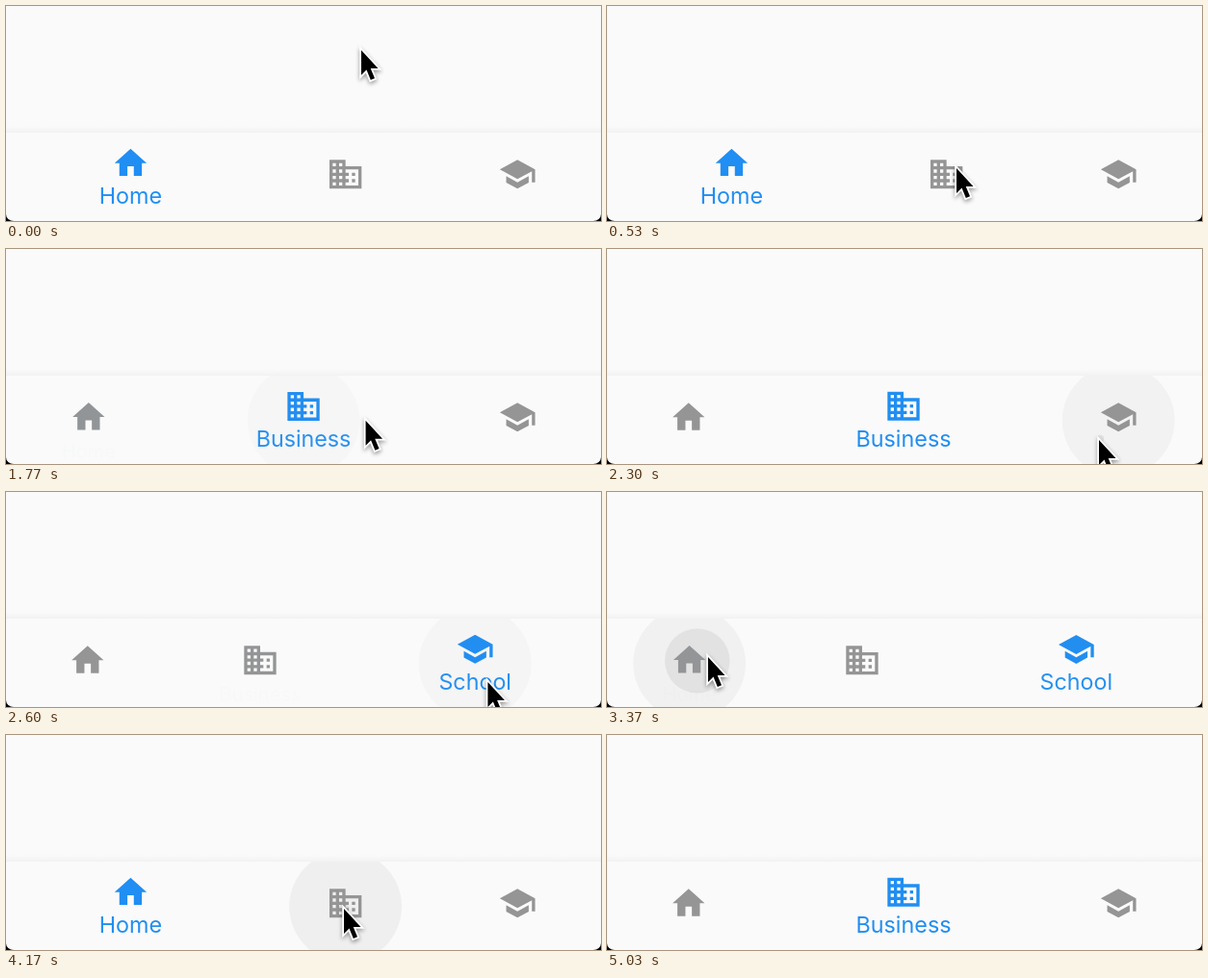
An HTML page with a canvas for the animation above (5.71 s loop, 618 by 224 pixels).

```html
<!DOCTYPE html>
<html lang="en">
<head>
<meta charset="utf-8">
<title>Bottom navigation</title>
<style>
  html, body { margin: 0; width: 100%; height: 100%; overflow: hidden; background: #000; }
  canvas { display: block; border-radius: 0 0 8px 8px / 0 0 7px 7px; }
</style>
</head>
<body>
<canvas width="618" height="224"></canvas>
<script>
const ctx = document.querySelector('canvas').getContext('2d');
const LOOP = 5710, WIDTH = 618, HEIGHT = 224;
const DP = 5 / 3;                       // pixels per layout unit
const BAR = { left: -3.5 - 0, top: 132, width: 375 * DP };
BAR.left = (WIDTH - 2 - BAR.width) / 2;
const INK_RADIUS = 35 * DP, INK_Y = BAR.top + 28 * DP;
const GREY = [149, 149, 149], BLUE = [32, 142, 242];

const items = [
  { label: 'Home', icon: new Path2D('M10 20v-6h4v6h5v-8h3L12 3 2 12h3v8z') },
  { label: 'Business', icon: new Path2D('M12 7V3H2v18h20V7H12zM6 19H4v-2h2v2zm0-4H4v-2h2v2zm0-4H4V9h2v2zm0-4H4V5h2v2zm4 12H8v-2h2v2zm0-4H8v-2h2v2zm0-4H8V9h2v2zm0-4H8V5h2v2zm10 12h-8v-2h2v-2h-2v-2h2v-2h-2V9h8v10zm-2-8h-2v2h2v-2zm0 4h-2v2h2v-2z') },
  { label: 'School', icon: new Path2D('M5 13.18v4L12 21l7-3.82v-4L12 17l-7-3.82zM12 3L1 9l11 6 9-4.91V17h2V9L12 3z') },
];

const taps = [
  { item: 1, down: 1470, up: 1610 },
  { item: 2, down: 2235, up: 2432 },
  { item: 0, down: 3262, up: 3354 },
  { item: 1, down: 4078, up: 4280 },
];

// Pointer path: time, x, y
const pointerPath = [
  [0, 369, 46], [30, 368, 48], [130, 356, 66], [230, 338, 97], [310, 333, 121],
  [400, 342, 147], [470, 355, 163], [530, 363, 169], [740, 363, 169], [770, 367, 169.5],
  [1080, 367, 169.5], [1150, 370, 170], [1240, 363, 173], [1330, 357, 174],
  [1700, 357, 174], [1790, 378, 180], [1900, 440, 192], [2000, 490, 199],
  [2070, 505, 201], [2100, 511, 199], [2500, 511, 199], [2600, 501, 198],
  [2680, 455, 192], [2870, 240, 176], [3000, 135, 172], [3110, 105, 172],
  [3500, 105, 172], [3600, 135, 171], [3760, 245, 172], [3900, 328, 178],
  [4000, 351, 181], [LOOP, 351, 181],
];
const POINTER_HIDDEN = 5000;
const arrow = new Path2D('M0 0V26L5.5 20.5 9.8 31 14 29.3 9.7 19H17.5Z');

const clamp = v => Math.min(1, Math.max(0, v));
const mix = (a, b, k) => a + (b - a) * k;

// cubic-bezier(.4, 0, .2, 1)
function ease(p) {
  p = clamp(p);
  let lo = 0, hi = 1;
  for (let i = 0; i < 24; i++) {
    const s = (lo + hi) / 2, r = 1 - s;
    if (1.2 * r * r * s + 0.6 * r * s * s + s ** 3 < p) lo = s; else hi = s;
  }
  return 3 * (1 - lo) * lo * lo + lo ** 3;
}

function pointerAt(t) {
  const i = Math.max(1, pointerPath.findIndex(k => k[0] > t));
  const [t0, x0, y0] = pointerPath[i - 1], [t1, x1, y1] = pointerPath[i];
  const k = (t - t0) / (t1 - t0);
  return [mix(x0, x1, k), mix(y0, y1, k)];
}

// How far each item is selected; the values always sum to 1
function selectionAt(t) {
  return taps.reduce((sel, tap) => {
    const k = ease((t - tap.up) / 200);
    return sel.map((v, i) => mix(v, i === tap.item ? 1 : 0, k));
  }, [1, 0, 0]);
}

function centersOf(sel) {
  let x = BAR.left;
  return sel.map(v => {
    const w = BAR.width * (1 + v / 2) / 3.5;
    x += w;
    return x - w / 2;
  });
}

function disc(x, y, r, color) {
  ctx.fillStyle = color;
  ctx.beginPath();
  ctx.arc(x, y, r, 0, 2 * Math.PI);
  ctx.fill();
}

function drawInk(t, centers) {
  ctx.save();
  ctx.beginPath();
  ctx.rect(0, BAR.top, WIDTH, HEIGHT);
  ctx.clip();
  for (const { item, down, up } of taps) {
    if (t < down || t > up + 200) continue;
    const cx = centers[item];
    const fade = clamp((t - up) / 200);
    const highlight = clamp((Math.min(t, up) - down) / 200) - fade;
    if (highlight > 0) disc(cx, INK_Y, INK_RADIUS, `rgba(188,188,188,${0.4 * highlight})`);
    const grow = clamp((Math.min(t, up) - down) / 1000 + Math.max(0, t - up) / 35);
    const [px, py] = pointerAt(down);
    disc(mix(px, cx, grow), mix(py, INK_Y, grow), INK_RADIUS * grow,
      `rgba(200,200,200,${0.4 * (1 - fade)})`);
  }
  ctx.restore();
}

function drawItem({ label, icon }, cx, sel) {
  const drop = 7 * DP * (1 - sel);
  ctx.fillStyle = `rgb(${GREY.map((c, i) => mix(c, BLUE[i], sel))})`;

  ctx.save();
  ctx.translate(cx - 12 * DP, BAR.top + 7 * DP + drop);
  ctx.scale(DP, DP);
  ctx.fill(icon);
  ctx.restore();

  ctx.save();
  ctx.globalAlpha = sel;
  ctx.translate(cx, 211 + drop);
  const size = mix(12 / 14, 1, sel);
  ctx.scale(size, size);
  ctx.fillText(label, 0, -5.5);
  ctx.restore();
}

function drawPointer(t) {
  ctx.save();
  ctx.translate(...pointerAt(t));
  ctx.lineWidth = 3.6;
  ctx.strokeStyle = '#fff';
  ctx.shadowColor = 'rgba(0,0,0,.4)';
  ctx.shadowBlur = 4;
  ctx.shadowOffsetY = 2;
  ctx.stroke(arrow);
  ctx.shadowColor = 'transparent';
  ctx.fillStyle = '#000';
  ctx.fill(arrow);
  ctx.restore();
}

const barShadow = ctx.createLinearGradient(0, 125, 0, BAR.top);
barShadow.addColorStop(0, '#fafafa');
barShadow.addColorStop(1, '#f2f2f2');
ctx.font = `${14 * DP}px Inter, sans-serif`;
ctx.textAlign = 'center';

function draw(now) {
  const t = now % LOOP;
  const sel = selectionAt(t), centers = centersOf(sel);
  ctx.fillStyle = '#fafafa';
  ctx.fillRect(0, 0, WIDTH, HEIGHT);
  ctx.fillStyle = barShadow;
  ctx.fillRect(0, 125, WIDTH, BAR.top - 125);
  drawInk(t, centers);
  items.forEach((item, i) => drawItem(item, centers[i], sel[i]));
  if (t < POINTER_HIDDEN) drawPointer(t);
  requestAnimationFrame(draw);
}
requestAnimationFrame(draw);
</script>
</body>
</html>
```
